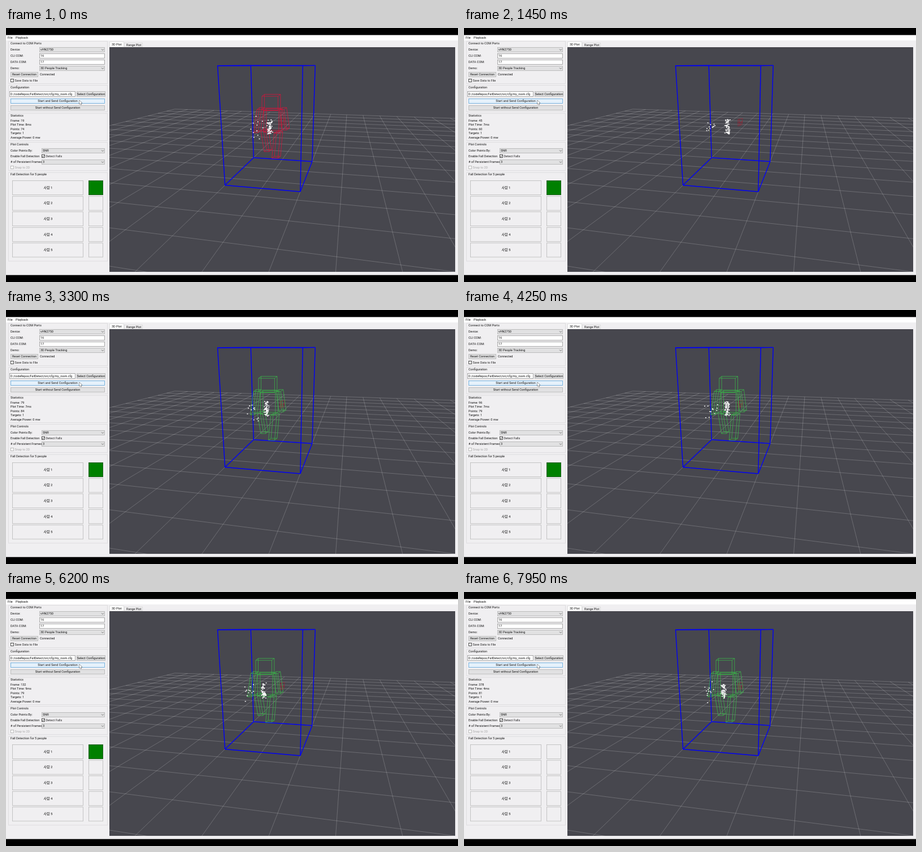
These frames come from a looping animation (800 by 450 pixels, 8000 ms). An HTML page with a canvas:

```html
<!DOCTYPE html>
<html lang="en">
<head>
<meta charset="utf-8">
<title>Fall detection monitor</title>
<style>
  html, body { margin: 0; width: 100%; height: 100%; overflow: hidden; background: #000; }
  canvas { display: block; width: 800px; height: 450px; }
</style>
</head>
<body>
<canvas id="stage" width="800" height="450"></canvas>
<script>
const ctx = document.getElementById('stage').getContext('2d');
const LOOP = 8000, STEP = 50, CUT = 6750;
const VIEW = { x: 183, y: 34, w: 612, h: 398 };
const FONT = 'Roboto, "Noto Sans CJK KR", "Noto Sans CJK", sans-serif';
const PANEL = '#f0eff1', GREEN = '#3bb54a', RED = '#d8143c';

// Horizontal sway of the tracked person: [time, x of the head].
const sway = [[0, 453], [1450, 452], [3300, 447], [5150, 456], [6200, 442], [7300, 451], [7950, 446]];

function swayAt(t) {
  const next = Math.max(1, sway.findIndex(([time]) => time >= t));
  const [t0, x0] = sway[next - 1], [t1, x1] = sway[next];
  const u = (t - t0) / (t1 - t0);
  return x0 + (x1 - x0) * u * u * (3 - 2 * u);
}

function random(seed) {
  let n = seed * 7919 + 17;
  const next = () => (n = (n * 16807 + 11) % 2147483647) / 2147483647;
  next();
  return next;
}

function text(str, x, y, { size = 5.5, color = '#111', align = 'left' } = {}) {
  ctx.font = `${size}px ${FONT}`;
  ctx.fillStyle = color;
  ctx.textAlign = align;
  ctx.textBaseline = 'middle';
  ctx.fillText(str, x, y);
}

function box(x, y, w, h, fill, stroke) {
  ctx.fillStyle = fill;
  ctx.fillRect(x, y, w, h);
  ctx.strokeStyle = stroke;
  ctx.lineWidth = .8;
  ctx.strokeRect(x + .5, y + .5, w - 1, h - 1);
}

function stroke(points, close) {
  ctx.beginPath();
  points.forEach(([x, y]) => ctx.lineTo(x, y));
  if (close) ctx.closePath();
  ctx.stroke();
}

function button(label, x, y, w, h, fill = '#e1e1e2', border = '#b4b4b4') {
  box(x, y, w, h, fill, border);
  text(label, x + w / 2, y + h / 2 + .3, { align: 'center' });
}

function input(value, x, y, w, h = 9, size = 5.5) {
  box(x, y, w, h, '#fff', '#8f8f8f');
  text(value, x + 2, y + h / 2 + .3, { size });
}

function combo(value, x, y, w) {
  box(x, y, w, 9, '#e1e1e2', '#b4b4b4');
  text(value, x + 2, y + 4.8);
  ctx.strokeStyle = '#555';
  stroke([[x + w - 6, y + 3.5], [x + w - 4, y + 5.5], [x + w - 2, y + 3.5]]);
}

function checkbox(label, x, y, checked, color = '#222') {
  box(x, y - 3, 6, 6, '#fff', color);
  if (checked) stroke([[x + 1.3, y], [x + 2.6, y + 1.4], [x + 4.8, y - 1.5]]);
  text(label, x + 7.5, y + .3, { color });
}

function group(title, y, h) {
  ctx.strokeStyle = '#dedde0';
  ctx.lineWidth = 1;
  ctx.strokeRect(4.5, y - 3.5, 175, h);
  text(title, 8, y);
}

// Orbit camera: 10 units from the floor origin, 60 degree field of view.
const rad = Math.PI / 180, DIST = 10;
const FOCAL = VIEW.w / 2 / Math.tan(30 * rad);
const sinE = Math.sin(17.6 * rad), cosE = Math.cos(17.6 * rad);
const sinA = Math.sin(12.2 * rad), cosA = Math.cos(12.2 * rad);

function toCamera([x, y, z]) {
  const forward = DIST * cosE + cosA * y - sinA * x;
  const down = DIST * sinE - z;
  return [cosA * x + sinA * y, down * cosE - forward * sinE, forward * cosE + down * sinE];
}

function line3d(from, to) {
  const near = .1;
  let a = toCamera(from), b = toCamera(to);
  if (a[2] < b[2]) [a, b] = [b, a];
  if (a[2] <= near) return;
  if (b[2] < near) {
    const k = (a[2] - near) / (a[2] - b[2]);
    b = a.map((v, i) => v + (b[i] - v) * k);
  }
  const screen = ([x, y, depth]) => [
    VIEW.x + VIEW.w / 2 + FOCAL * x / depth,
    VIEW.y + VIEW.h / 2 + FOCAL * y / depth
  ];
  stroke([screen(a), screen(b)]);
}

function drawRoom() {
  ctx.strokeStyle = 'rgba(255,255,255,.25)';
  ctx.lineWidth = .8;
  for (let i = -10; i <= 10; i++) {
    line3d([i, -10, 0], [i, 10, 0]);
    line3d([-10, i, 0], [10, i, 0]);
  }

  ctx.strokeStyle = '#0000f5';
  ctx.lineWidth = 1.4;
  const corners = [[-1, 0], [1, 0], [1, -2.5], [-1, -2.5]];
  corners.forEach((corner, i) => {
    const next = corners[(i + 1) % 4];
    line3d([...corner, 0], [...next, 0]);
    line3d([...corner, 3], [...next, 3]);
    line3d([...corner, 0], [...corner, 3]);
  });
}

function drawSensor() {
  ctx.strokeStyle = '#a81c30';
  ctx.lineWidth = .6;
  stroke([[485, 162], [493, 160], [492, 171], [485, 174]], true);
  stroke([[487, 161], [488, 172], [492, 166], [485, 168]]);
}

// Slanted box seen in perspective; cx0 and cx1 are the centres of its top and bottom.
function limb(cx0, top, cx1, bottom, width) {
  const r = width / 2;
  const front = [[cx0 - r, top], [cx0 + r, top], [cx1 + r, bottom], [cx1 - r, bottom]];
  const back = front.map(([x, y]) => [x + 4.5, y - 3.5]);
  stroke(front, true);
  stroke(back, true);
  front.forEach((corner, i) => stroke([corner, back[i]]));
}

function drawFigure(x, color) {
  ctx.save();
  ctx.translate(x, 117);
  ctx.scale(.98, .98);
  ctx.strokeStyle = color;
  ctx.lineWidth = .8;
  limb(14.5, 4, 14.5, 29, 29);
  limb(17, 30, 17, 69, 27);
  for (const side of [-1, 1]) {
    limb(15.5 + 20.5 * side, 28, 15 + 26 * side, 67.5 - 2.5 * side, 8);
    limb(15 + 12.5 * side, 69 + 2 * side, 16 + 7.5 * side, 110 + 6 * side, 10 + side);
  }
  ctx.restore();
}

// Each radar frame adds a strand of echoes along the body and a few strays beside it.
function drawEchoes(frame, x) {
  const rnd = random(frame);
  const spread = () => rnd() + rnd() + rnd() - 1.5;
  const dot = (px, py) => ctx.fillRect(px - 1, py - .7, 2, 1.4);
  const bend = spread() * 3;
  ctx.fillStyle = '#fff';
  for (let i = 0; i < 20; i++) {
    const u = rnd();
    dot(x + 14 + Math.sin(u * 5) * bend + spread() * 4, 162 + u * 26 + spread());
  }
  for (let i = 0; i < 4; i++) dot(x - 12 + spread() * 14, 177 + spread() * 18);
}

function frameAt(t) {
  return Math.floor(t < CUT ? 19 + t * .0183 : 367 + (t - 7300) * .0177);
}

function activePerson(t) {
  if (t >= CUT) return -1;
  return t >= 4300 && t < 5900 ? 1 : 0;
}

function drawPanel(t) {
  const frame = frameAt(t), rnd = random(frame);
  ctx.fillStyle = PANEL;
  ctx.fillRect(0, 12.7, 800, 425);
  ctx.fillStyle = '#fff';
  ctx.fillRect(0, 12.7, 800, 9.3);
  text('File', 3, 17);
  text('Playback', 17, 17);

  group('Connect to COM Ports', 27, 75);
  ['Device:', 'CLI COM:', 'DATA COM:', 'Demo:'].forEach((s, i) => text(s, 8, 38 + i * 11));
  combo('vHN2750', 59, 34, 116);
  input('16', 59, 45, 116);
  input('17', 59, 56, 116);
  combo('3D People Tracking', 59, 67, 116);
  button('Reset Connection', 8, 78, 49, 9);
  text('Connected', 60, 82.5);
  checkbox('Save Data to File', 8, 93);

  group('Configuration', 105, 47);
  input('D:/codeRepos/FallDetect/src/cfg/my_room.cfg', 6, 112, 117, 10, 5.2);
  button('Select Configuration', 125, 112, 51, 10);
  button('Start and Send Configuration', 8, 125, 167, 9, '#e5f1fb', '#5fa6da');
  button('Start without Send Configuration', 8, 137, 167, 9);

  group('Statistics', 155, 48);
  const plotTime = 4 + Math.floor(rnd() * 8), points = 60 + Math.floor(rnd() * 33);
  [`Frame: ${frame}`, `Plot Time: ${plotTime}ms`, `Points: ${points}`,
    'Targets: 1', 'Average Power: 0 mw'].forEach((s, i) => text(s, 8, 164 + i * 7.6));

  group('Plot Controls', 206, 50);
  text('Color Points By:', 8, 217);
  combo('SNR', 63, 213, 112);
  text('Enable Fall Detection', 8, 227);
  checkbox('Detect Falls', 63, 227, true);
  text('# of Persistent Frames', 8, 237);
  combo('3', 63, 233, 112);
  checkbox('Snap to 2D', 8, 247, false, '#a8a8a8');

  group('Fall Detection for 5 people', 259.5, 157);
  const active = activePerson(t);
  for (let i = 0; i < 5; i++) {
    const y = 270 + i * 27.6;
    const [fill, border] = i === active ? ['#008000', '#2a5a2a'] : [PANEL, '#b8b8b8'];
    box(11, y, 126, 26, PANEL, '#b8b8b8');
    text(`사람 ${i + 1}`, 74.5, y + 13, { size: 6, align: 'center' });
    box(146, y, 26, 26, fill, border);
  }

  box(183, 24, 26, 10, '#fff', '#d9d9d9');
  box(209, 26, 33, 8, PANEL, '#d9d9d9');
  text('3D Plot', 187, 29.5);
  text('Range Plot', 213, 30);
}

function drawCursor() {
  ctx.fillStyle = '#fff';
  ctx.strokeStyle = '#000';
  ctx.lineWidth = .7;
  stroke([[130, 128], [130, 135], [131.6, 133.6], [132.6, 136], [133.6, 135.5], [132.6, 133.2], [134.6, 133]], true);
  ctx.fill();
}

function drawPlot(t) {
  const x = swayAt(t), frame = frameAt(t);
  ctx.save();
  ctx.beginPath();
  ctx.rect(VIEW.x, VIEW.y, VIEW.w, VIEW.h);
  ctx.clip();
  ctx.fillStyle = '#47474e';
  ctx.fill();
  drawRoom();
  drawSensor();
  const hidden = t >= 1300 && t < 1600;
  if (!hidden) drawFigure(x, t < 1300 ? RED : GREEN);
  for (let age = 0; age < 3; age++) drawEchoes(frame - age, x);
  ctx.restore();
}

function draw(now) {
  const t = Math.floor(now % LOOP / STEP) * STEP;
  ctx.fillStyle = '#000';
  ctx.fillRect(0, 0, 800, 450);
  drawPanel(t);
  drawCursor();
  drawPlot(t);
}

const start = performance.now();
function tick() {
  draw(performance.now() - start);
  requestAnimationFrame(tick);
}
tick();
</script>
</body>
</html>
```
